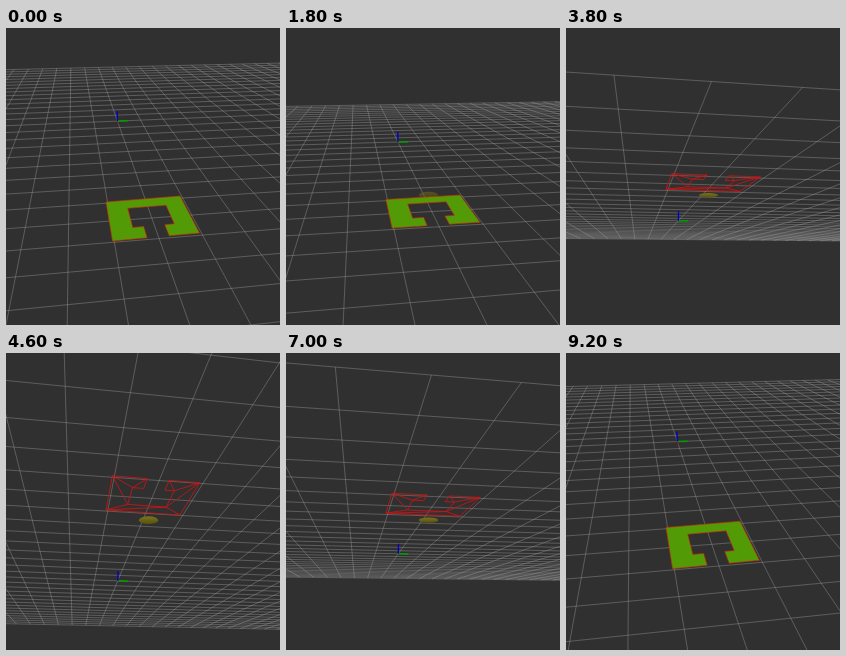
Write an HTML page with a canvas that moves like this. It is 274x297 px and loops after 10 s.

```html
<!DOCTYPE html>
<html>
<head>
<meta charset="utf-8">
<style>
html, body { margin: 0; width: 100%; height: 100%; overflow: hidden; background: #303030; }
canvas { display: block; }
</style>
</head>
<body>
<canvas id="view" width="274" height="297"></canvas>
<script>
const ctx = document.getElementById("view").getContext("2d");
const W = 274, H = 297, LOOP = 10000, STEP = 200;
const CX = 142.5, CY = 166, FOCAL = 440, DIST = 12;
const YAW = 0.157, COS = Math.cos(YAW), SIN = Math.sin(YAW);
const HALF = 15, ORIGIN = { w: -0.14, u: 7.6 };
const LIFT = 0.035;  // height of the sheet above the grid
const START = 24.6;

// The camera swings under the ground, rests, and swings back: [ms, degrees]
const SWING = [
  [800, START], [1800, 17.6], [3000, 2.8], [4600, -20.9],
  [5000, -25.6], [6200, -26.4], [8000, 6.5], [9200, 26.1]
];
const REST = { from: 5000, nudge: 5800, to: 6200 };

const mix = (a, b, k) => a + (b - a) * k;
const mixPoint = (a, b, k) => a.map((v, i) => mix(v, b[i], k));

function pitchAt(t) {
  let time = Math.floor(t / STEP) * STEP;
  if (time >= REST.from && time < REST.to) time = time < REST.nudge ? REST.from : REST.nudge;
  const next = SWING.findIndex(key => key[0] >= time);
  if (next < 0) return SWING[SWING.length - 1][1];
  if (next === 0) return START;
  const [t0, p0] = SWING[next - 1], [t1, p1] = SWING[next];
  return mix(p0, p1, (time - t0) / (t1 - t0));
}

// Orbit camera around the ground point (0, 0); w runs right, u forward, z up
function camera(degrees) {
  const a = degrees * Math.PI / 180, s = Math.sin(a), c = Math.cos(a);
  return {
    s,
    project([w, u, z = 0]) {
      const x = w * COS - u * SIN, y = u * COS + w * SIN;
      const k = FOCAL / (DIST + y * c - z * s);
      return [CX + x * k, CY - (y * s + z * c) * k];
    },
    // Where the ray through a pixel meets the plane at height z
    toPlane([px, py], z) {
      const v = (CY - py) / FOCAL;
      const y = (v * (DIST - z * s) - z * c) / (s - v * c);
      const x = (px - CX) / FOCAL * (DIST + y * c - z * s);
      return [x * COS + y * SIN, y * COS - x * SIN, z];
    }
  };
}

// A four-sided sheet with a T-shaped cut-out, in fractions of its sides
function makeSheet() {
  const first = camera(START);
  const [a, b, c, d] = [[100, 174], [174, 168], [193.5, 205], [106.5, 213]]
    .map(p => first.toPlane(p, LIFT));
  const at = (u, v) => mixPoint(mixPoint(a, b, u), mixPoint(d, c, u), v);
  const top = 0.235, foot = 0.74, left = 0.26, right = 0.76, gapL = 0.39, gapR = 0.645;
  return [
    a, b, c, at(gapR, 1), at(gapR, foot), at(right, foot), at(right, top),
    at(left, top), at(left, foot), at(gapL, foot), at(gapL, 1), d
  ];
}
const sheet = makeSheet();
const seams = [[10, 8, 11, 7, 0, 6, 2, 5, 3], [1, 6]];

function polyline(points) {
  points.forEach((p, i) => i ? ctx.lineTo(...p) : ctx.moveTo(...p));
}

function line(cam, a, b, color, width) {
  ctx.beginPath();
  polyline([cam.project(a), cam.project(b)]);
  stroke(color, width);
}

function stroke(color, width) {
  ctx.strokeStyle = color;
  ctx.lineWidth = width;
  ctx.stroke();
}

function drawGrid(cam) {
  const { w, u } = ORIGIN, color = "rgba(160,160,164,0.5)";
  for (let i = -HALF; i <= HALF; i++) {
    line(cam, [w + i, u - HALF], [w + i, u + HALF], color, 0.8);
    line(cam, [w - HALF, u + i], [w + HALF, u + i], color, 0.8);
  }
}

function drawAxes(cam) {
  const { w, u } = ORIGIN, len = 0.44;
  line(cam, [w, u], [w, u - len], "#901010", 1.2);
  line(cam, [w, u], [w + len, u], "#00a000", 1.5);
  line(cam, [w, u], [w, u, len], "#0000c8", 1.3);
}

function drawDisc(cam) {
  const r = 9.7, ry = r * Math.abs(cam.s) * 0.9 + 0.8, y = CY + 1.2;
  const shade = ctx.createLinearGradient(0, y - ry, 0, y + ry);
  shade.addColorStop(0, "#7c751a");
  shade.addColorStop(1, "#565010");
  ctx.globalAlpha = cam.s > 0 ? 0.5 : 1;
  ctx.beginPath();
  ctx.ellipse(CX, y, r, ry, 0, 0, Math.PI * 2);
  ctx.fillStyle = shade;
  ctx.fill();
  ctx.globalAlpha = 1;
}

function drawSheet(cam) {
  const pts = sheet.map(cam.project);
  ctx.beginPath();
  polyline(pts);
  ctx.closePath();
  if (cam.s > 0) {
    ctx.fillStyle = "#529a06";
    ctx.fill();
    stroke("rgba(215,40,10,0.7)", 0.9);
  } else {
    seams.forEach(seam => polyline(seam.map(i => pts[i])));
    stroke("#c81616", 0.85);
  }
}

function draw(t) {
  const cam = camera(pitchAt(t));
  ctx.fillStyle = "#303030";
  ctx.fillRect(0, 0, W, H);
  ctx.lineJoin = "round";
  drawGrid(cam);
  drawAxes(cam);
  if (t >= 1000 && t < 9200) drawDisc(cam);
  drawSheet(cam);
}

const begin = performance.now();
function tick() {
  draw((performance.now() - begin) % LOOP);
  requestAnimationFrame(tick);
}
tick();
</script>
</body>
</html>
```
